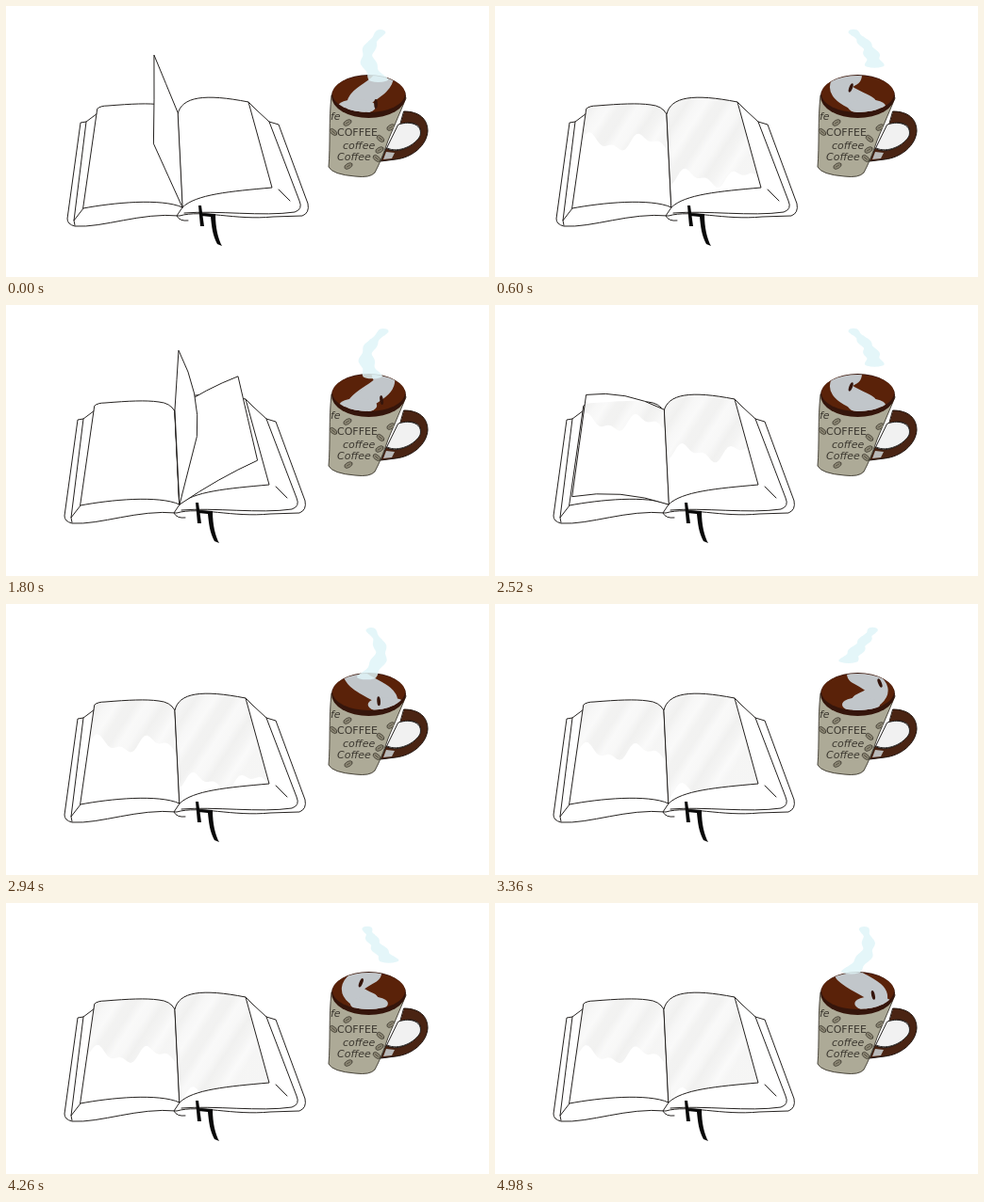
Recreate the animation shown at these times as an HTML page with a canvas. Size 512x288 px, loop 5040 ms.

```html
<!DOCTYPE html>
<html lang="en">
<head>
<meta charset="utf-8">
<title>Book and coffee</title>
<style>
html, body { margin: 0; width: 100%; height: 100%; overflow: hidden; background: #fff }
canvas { display: block; width: 512px; height: 288px }
</style>
</head>
<body>
<canvas id="stage" width="512" height="288"></canvas>
<script>
const c = document.getElementById('stage').getContext('2d');
const LOOP = 5040, STEP = 60, SWIRL = 1920, FLIP = 900;
const INK = '#24211f', BROWN = '#5a2209', DARK = '#35150b', CLAY = '#adaa97', MILK = '#c1c6ca';
const { sin, cos, PI, abs, exp } = Math;
const clamp = x => Math.max(0, Math.min(1, x));
const path = d => new Path2D(d);

function oval(x, y, rx, ry, turn = 0) {
  const shape = new Path2D();
  shape.ellipse(x, y, rx, ry, turn, 0, 2 * PI);
  return shape;
}

function paint(shape, fill, stroke, width = 1) {
  if (fill) { c.fillStyle = fill; c.fill(shape); }
  if (stroke) { c.strokeStyle = stroke; c.lineWidth = width; c.stroke(shape); }
}

function clipped(shapes, drawInside) {
  c.save();
  shapes.forEach(shape => c.clip(shape));
  drawInside();
  c.restore();
}

// ---- Book ----
const leftPage = path('M94 107Q97 104 105 104C130 102 148 101 162 103Q174 104 179 113L184 212C162 202 110 207 79 213Z');
const rightPage = path('M179 113C183 94 208 91 254 100L279 191C235 195 198 198 184 212Z');
const cover = path('M94 112L82 121L76 122L62 224Q62 230 70 232C100 234 140 217 181 221C205 214 240 226 280 222L311 221Q319 218 317 208L286 124L276 121L262 108L254 100');
const trim = path('M82 121L69 226L79 213M69 226L70 231M276 121L308 205Q312 214 303 217C270 222 220 215 186 218M184 212L178 221Q181 227 190 226M286 193L298 205');
const ribbon = path('M201 210L204 210L207 232L203 232ZM204 218L219 219C219 234 222 246 226 253L221 251C216 242 215 232 214 222L204 221Z');
const flipStarts = [-530, 1375, 1655];

// The outer edge swings over the spine as u goes from 0 (right) to 1 (left).
function drawLeaf(u) {
  const across = cos(PI * u), up = sin(PI * u);
  const bow = 14 * clamp(1 - abs(u - .47) * 8);
  const lift = 14 * across ** 8;
  const tx = 176 + 80 * across, ty = 102 - 54 * up;
  const bx = 180 + 99 * across + bow, by = 192 + 20 * u - 62 * up;
  const leaf = new Path2D();
  leaf.moveTo(179, 111);
  leaf.quadraticCurveTo((179 + tx) / 2, (111 + ty) / 2 - lift, tx, ty);
  leaf.quadraticCurveTo((tx + bx) / 2 + bow, (ty + by) / 2, bx, by);
  leaf.quadraticCurveTo((184 + bx) / 2, (212 + by) / 2 - lift, 184, 212);
  leaf.closePath();
  paint(leaf, '#fff', INK);
}

// Soft diagonal streaks that end in a wavy lower edge.
function shadePage(page, x, depth) {
  const edge = new Path2D();
  edge.moveTo(x, 80);
  for (let i = 0; i <= 105; i += 3)
    edge.lineTo(x + i, depth + 7 * sin(i / 9 + x) + 4 * sin(i / 4));
  edge.lineTo(x + 105, 80);
  const g = c.createLinearGradient(x, 105, x + 85, 160);
  for (let i = 0; i <= 12; i++)
    g.addColorStop(i / 12, `hsl(60 3% ${96 + 2 * cos(i * 1.7)}%)`);
  clipped([page, edge], () => {
    c.globalCompositeOperation = 'multiply';
    c.fillStyle = g;
    c.fillRect(x, 80, 110, 140);
  });
}

function drawBook(t) {
  const drift = 1 - clamp((t - 1100) / 600);
  c.save();
  c.translate(3 * drift, 2 * drift);
  paint(cover, '#fff', INK);
  paint(trim, null, INK);
  paint(leftPage, '#fff', INK);
  paint(rightPage, '#fff', INK);

  const moving = flipStarts.map(start => (t - start) / FLIP).filter(u => u > 0 && u < 1);
  if (moving.at(-1) < .5) moving.reverse();
  moving.forEach(drawLeaf);

  if (moving.every(u => u > .9)) {
    const landed = Math.max(...flipStarts.filter(start => start < t)) + .9 * FLIP;
    const grown = 1 - exp(-Math.max(0, t - landed) / 400);
    shadePage(leftPage, 78, 120 + 42 * grown);
    shadePage(rightPage, 178, 150 + 56 * grown);
  }
  paint(ribbon, '#080808');
  c.restore();
}

// ---- Mug ----
const body = path('M345 95C342 122 344 148 342 171Q346 179 370 181Q386 183 391 177Q398 164 405 143L424 98Z');
const handle = path('M422 112C438 112 447 120 447 133C446 148 431 161 413 163L397 165L403 151C412 158 432 151 439 137C442 126 431 121 418 126Z');
const hole = path('M416 126C430 121 442 127 439 138C434 148 416 157 404 151Z');
const gloss = path('M403 155L412 156L409 162L400 163Z');
const rim = oval(384.5, 96, 39.5, 23);
const surface = oval(384.5, 93.5, 38.5, 19.5);
const beans = [[362, 124], [347, 134], [408, 129], [397, 141], [396, 153], [393, 162], [363, 170]];

function write(text, x, y, style = '') {
  c.font = `${style} 11px "DejaVu Sans", sans-serif`;
  c.fillStyle = '#3b372f';
  c.fillText(text, x, y);
}

function drawBean([x, y], i) {
  const turn = i % 2 ? .7 : -.5;
  paint(oval(x, y, 4.5, 2.6, turn), '#8d8875', '#3d392f', .8);
  paint(oval(x, y, 3, .3, turn), '#3d392f');
}

// A band of milk that sways from side to side across the coffee.
function drawMilk(a) {
  const topX = 384 + 16 * cos(a), endX = 388 - 16 * cos(a), bulge = -26 * sin(a);
  const band = new Path2D();
  band.moveTo(topX, 74);
  band.bezierCurveTo(topX + bulge, 88, endX + bulge, 94, endX, 106);
  paint(band, null, MILK, 22);
  paint(oval(endX, 107, 20, 8), MILK);
  paint(oval(392 - 16 * sin(a), 94 + 10 * cos(2 * a), 1.8, 5, .4 * sin(a)), DARK);
}

// A wisp built from discs along a swaying spine, thinner towards the top.
function drawSteam(a) {
  const lowX = 390 + 16 * sin(a + .3), highX = 391 - 12 * sin(a - .6);
  const lowY = 69 + 9 * cos(2 * a), wisp = new Path2D();
  for (let s = 0; s <= 1; s += .02) {
    const x = lowX + (highX - lowX) * s - 13 * cos(a) * sin(PI * s);
    const y = lowY + (27 - lowY) * s;
    wisp.addPath(oval(x, y, 4 + 5 * (1 - s) + 1.5 * cos(6 * PI * s), 3));
  }
  c.globalAlpha = .85;
  paint(wisp, '#e0f5f8');
  c.globalAlpha = 1;
}

function drawMug(a) {
  paint(handle, '#4a2413', '#1f130e');
  paint(hole, '#f1f1f1', INK);
  paint(gloss, '#b9b9b9');
  paint(body, CLAY, '#4a463c');
  clipped([body], () => {
    write('fe', 344, 121, 'italic');
    write('COFFEE', 351, 138);
    write('coffee', 357, 152, 'italic');
    write('Coffee', 351, 164, 'italic');
    beans.forEach(drawBean);
  });
  paint(rim, DARK);
  paint(surface, BROWN);
  clipped([surface], () => drawMilk(a));
  drawSteam(a);
}

function draw(now) {
  const t = Math.floor(now % LOOP / STEP) * STEP;
  c.fillStyle = '#fff';
  c.fillRect(0, 0, 512, 288);
  c.lineJoin = c.lineCap = 'round';
  drawBook(t);
  drawMug(2 * PI * t / SWIRL);
}

let begin;
function tick(now) {
  begin ??= now;
  draw(now - begin);
  requestAnimationFrame(tick);
}
draw(0);
requestAnimationFrame(tick);
</script>
</body>
</html>
```
